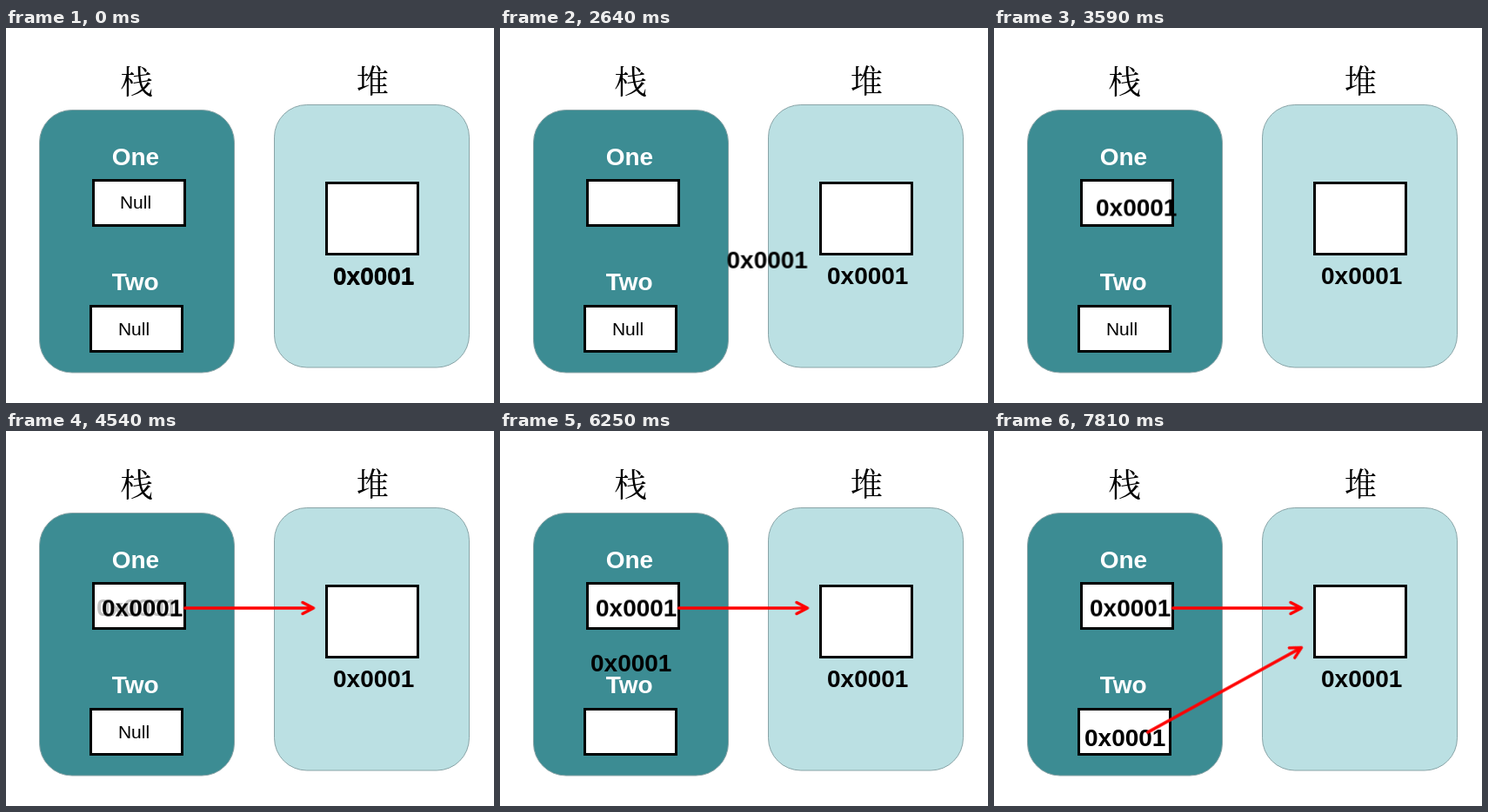
Recreate the animation shown at these times as an HTML page. Size 561 by 432 pixels, loop 8.8 s.

```html
<!DOCTYPE html>
<html lang="zh-CN">
<head>
<meta charset="utf-8">
<title>栈与堆</title>
<style>
  html, body { margin: 0; width: 100%; height: 100%; overflow: hidden; background: #fff; }
  svg { display: block; width: 561px; height: 432px; }
  text { font-family: Arial, "Liberation Sans", sans-serif; white-space: pre; }
  .title { font: 37.3px SimSun, "Noto Serif CJK SC", "Noto Sans CJK SC", serif; }
  .name { font-size: 28px; font-weight: 700; fill: #fff; }
  .address { font-size: 28px; font-weight: 700; }
  .value { font-size: 21px; }
  .panel { stroke: #89a4a7; stroke-width: 1; }
  .cell { fill: #fff; stroke: #000; stroke-width: 3; }
  .arrow { fill: none; stroke: #f00; stroke-width: 3.4; stroke-linecap: round; stroke-linejoin: round; }
</style>
</head>
<body>
<svg viewBox="0 0 561 432">
  <rect class="panel" x="38.5" y="94.5" width="224" height="302.5" rx="37.3" fill="#3c8c93"/>
  <rect class="panel" x="308.5" y="88.5" width="224" height="302.5" rx="37.3" fill="#bbe0e3"/>
  <text class="title" x="131.5" y="75.5">栈</text>
  <text class="title" x="402.7" y="74.5">堆</text>

  <text class="name" x="121.7" y="158">One</text>
  <text class="name" x="121.7" y="302">Two</text>
  <rect class="cell" x="100.5" y="175.5" width="105" height="52"/>
  <rect class="cell" x="97.5" y="320.5" width="105" height="52"/>
  <rect class="cell" x="368.5" y="178.5" width="105" height="82"/>
  <text class="address" x="376" y="295">0x0001</text>

  <text class="value" id="nullOne" x="130.9" y="208">Null</text>
  <text class="value" id="nullTwo" x="128.9" y="354">Null</text>
  <text class="address" id="firstCopy">0x0001</text>
  <text class="address" id="secondCopy">0x0001</text>

  <path class="arrow" id="arrowOne" transform="translate(353.5 204)" d="M-148 0H0M-12.5-6.5L0 0L-12.5 6.5"/>
  <path class="arrow" id="arrowTwo" transform="translate(353.5 249.5) rotate(-28.9)" d="M-202 0H0M-12.5-6.5L0 0L-12.5 6.5"/>
</svg>
<script>
  const LOOP = 8800;
  const byId = id => document.getElementById(id);

  function play(id, frames) {
    byId(id).animate(frames, { duration: LOOP, iterations: Infinity });
  }

  function fade(id, from, to, start, end) {
    play(id, [
      { opacity: from, offset: 0 },
      { opacity: from, offset: start / LOOP },
      { opacity: to, offset: end / LOOP },
      { opacity: to, offset: 1 }
    ]);
  }

  // Progress 0..1 with constant acceleration, cruise and deceleration.
  function glide(time, total, speedUp, slowDown) {
    const speed = 1 / (total - (speedUp + slowDown) / 2);
    if (time < speedUp) return speed * time * time / (2 * speedUp);
    const left = total - time;
    if (left < slowDown) return 1 - speed * left * left / (2 * slowDown);
    return speed * (time - speedUp / 2);
  }

  function move(id, { start, end, speedUp, slowDown, path }) {
    const steps = 60;
    const total = end - start;
    const at = (progress, time) => {
      const [x, y] = path(progress);
      return { transform: `translate(${x.toFixed(2)}px, ${y.toFixed(2)}px)`, offset: time / LOOP };
    };
    const frames = [at(0, 0)];
    for (let i = 0; i <= steps; i++) {
      const time = total * i / steps;
      frames.push(at(glide(time, total, speedUp, slowDown), start + time));
    }
    frames.push(at(1, LOOP));
    play(id, frames);
  }

  // Dips a little, then runs straight up to the first cell.
  function heapToStack(progress) {
    const x = 376 - 266 * progress;
    const bend = Math.max(0, x - 292);
    return [x, 213 + 0.42 * (x - 110) - 0.00414 * bend * bend];
  }

  fade('nullOne', 1, 0, 590, 1300);
  move('firstCopy', { start: 1870, end: 3830, speedUp: 300, slowDown: 760, path: heapToStack });

  play('arrowOne', [[0, 0], [3950, 0.35], [4160, 0.75], [4290, 1], [LOOP, 1]].map(
    ([time, opacity]) => ({ opacity, offset: time / LOOP, easing: 'steps(1, end)' })));

  fade('secondCopy', 0, 1, 4500, 4680);
  fade('nullTwo', 1, 0, 4980, 5220);
  move('secondCopy', {
    start: 5370, end: 7250, speedUp: 650, slowDown: 500,
    path: progress => [104, 213.4 + 150 * progress]
  });
  fade('arrowTwo', 0, 1, 7270, 7810);
</script>
</body>
</html>
```
